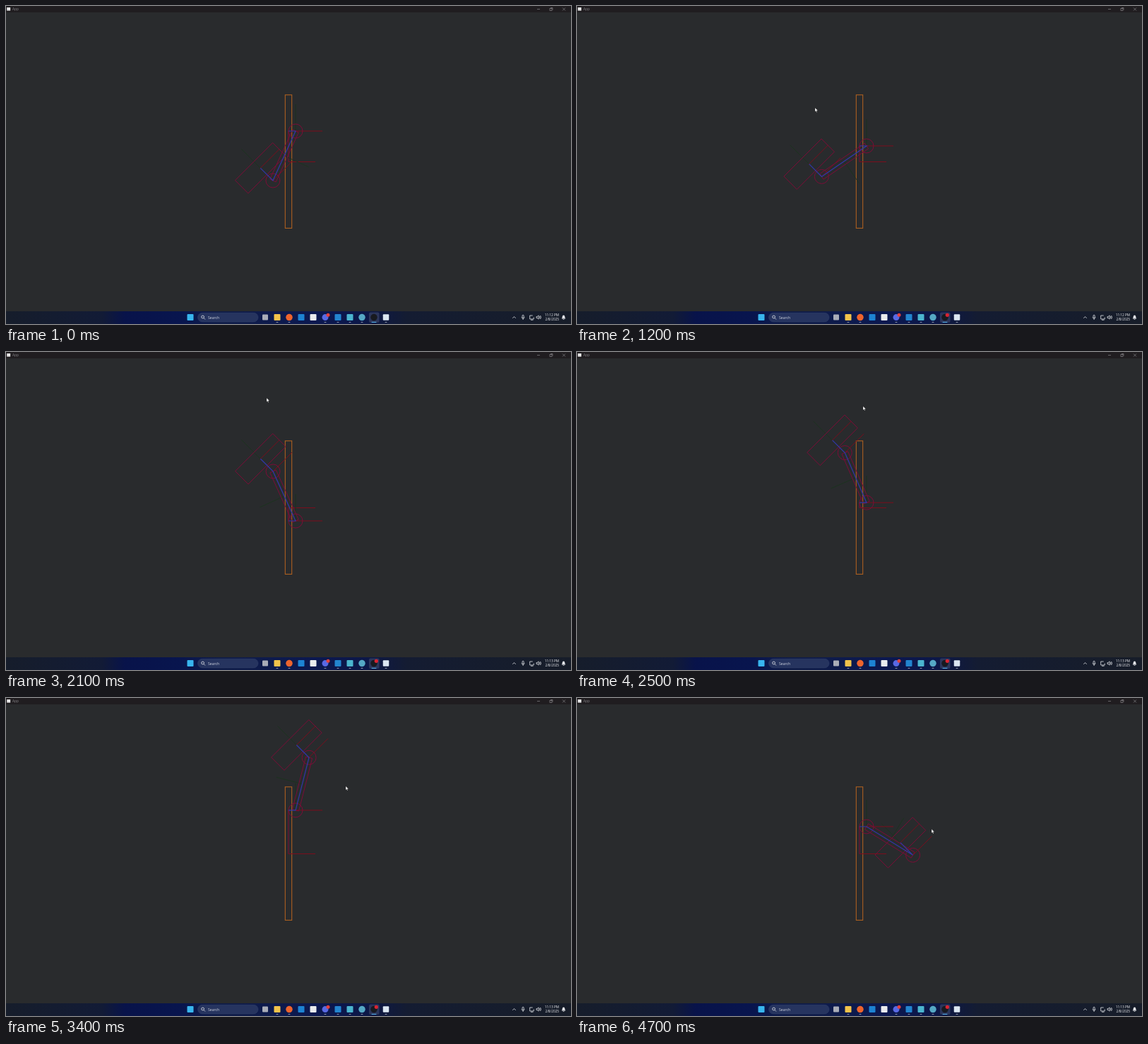
An HTML page for the animation above (4.8 s loop, 800 px wide and 450 px high).

```html
<!DOCTYPE html>
<html lang="en">
<head>
<meta charset="utf-8">
<title>App</title>
<style>
html, body { margin: 0; width: 100%; height: 100%; overflow: hidden; background: #292b2d; }
svg { display: block; width: 100vw; height: 100vh; }
text { font-family: "Open Sans", "Noto Sans", sans-serif; }
.line { fill: none; stroke-width: 1; }
.body { stroke: #7d0c37; }
.red { stroke: #7c0d1c; }
.green { stroke: #1c331f; }
.blue { stroke: #3038a8; stroke-width: 1.2; }
.tray { fill: none; stroke: #e4e6ea; stroke-width: .8; }
</style>
</head>
<body>
<svg viewBox="0 0 800 450" preserveAspectRatio="none">
  <defs>
    <linearGradient id="bar">
      <stop offset="0" stop-color="#161d2b"/>
      <stop offset=".17" stop-color="#121b36"/>
      <stop offset=".21" stop-color="#08134a"/>
      <stop offset=".31" stop-color="#08154e"/>
      <stop offset=".38" stop-color="#101d48"/>
      <stop offset=".55" stop-color="#0b1850"/>
      <stop offset=".64" stop-color="#0c1747"/>
      <stop offset=".71" stop-color="#141c32"/>
      <stop offset="1" stop-color="#171d29"/>
    </linearGradient>
  </defs>
  <rect width="800" height="450" fill="#292b2d"/>

  <!-- title bar -->
  <rect width="800" height="9" fill="#201d20"/>
  <rect x="1.2" y="2" width="5" height="4.6" fill="#e6e6e6"/>
  <text x="9" y="6.2" font-size="4.8" fill="#858386">App</text>
  <g fill="none" stroke="#858386" stroke-width=".7">
    <path d="M752 4.5h4M788 2.5l4 4m0-4l-4 4"/>
    <rect x="770" y="3.4" width="3" height="3"/>
    <path d="M771 2.5h3v3"/>
  </g>

  <!-- mechanism -->
  <rect class="line" x="395.3" y="125.8" width="9.4" height="188.6" stroke="#b9651f"/>
  <path class="line red" d="M400 220.5H438"/>
  <path class="line body" id="mast"/>
  <path class="line green" id="greens"/>
  <path class="line red" id="reds"/>
  <path class="line body" id="bodies"/>
  <path class="line blue" id="links"/>

  <!-- taskbar -->
  <rect y="432" width="800" height="18" fill="url(#bar)"/>
  <rect x="271.5" y="434.3" width="85.5" height="12.6" rx="6.3" fill="#26345f" stroke="#34426c" stroke-width=".5"/>
  <circle cx="278.6" cy="440" r="1.9" class="tray"/>
  <path class="tray" d="M280 441.5l2 2"/>
  <text x="286" y="442.6" font-size="5.1" fill="#d3d7e2">Search</text>
  <rect x="514" y="433.5" width="14.5" height="14.5" rx="2" fill="#2c365b"/>
  <g id="icons"></g>
  <g id="recording"><circle cx="524.3" cy="437.3" r="2.6" fill="#d92332"/></g>
  <path class="tray" d="M717.3 441.8l2.2-2.2 2.2 2.2"/>
  <rect x="731" y="437.3" width="2.2" height="4" rx="1.1" class="tray"/>
  <path class="tray" d="M730 440.5q2.100 4 4.200 0M732.100 442.500v1.500"/>
  <path class="tray" d="M747.200 440.500v2.500h-5.500v-5h4M743 444.300h3.500"/>
  <path class="tray" d="M751 439.500h1.300l1.700-1.700v5.400l-1.700-1.700h-1.300zM755.300 439q1.200 1.500 0 3M756.500 438q2 2.500 0 5"/>
  <g font-size="4.700" fill="#f0f1f4" text-anchor="end">
    <text id="clock" x="783" y="438.700"></text>
    <text x="783" y="445.200">2/8/2025</text>
  </g>
  <path d="M786.700 442.500q1-1 1-3 .3-2 1.800-2t1.800 2q0 2 1 3zM788.600 443.200h1.800v.8h-1.800z" fill="#e4e6ea"/>

  <path id="cursor" d="M0 0V5.600L1.300 4.400 2.200 6.400 3.100 6 2.200 4.100H4z" fill="#fff" stroke="#111" stroke-width=".3"/>
</svg>
<script>
const LOOP = 4800, STEP = 100, ARM = 77, AXIS = 38, JOINT = 10;
const D = Math.SQRT1_2;
const $ = id => document.getElementById(id);

// time, arm angle in degrees, shoulder height
const armKeys = [
  [0, 114.6, 177], [600, 116.500, 178.500], [800, 120.600, 182], [1000, 131, 189],
  [1200, 145.700, 198], [1800, 221, 246], [2100, 245.500, 239], [2400, 244.500, 221],
  [3000, 256.500, 174], [3300, 276, 159], [3900, 326.100, 158], [4200, 359, 159], [4700, 391.600, 182]
];
// time, pointer tip
const cursorKeys = [
  [100, 500, 405], [250, 380, 290], [400, 267, 235], [600, 294, 223], [800, 305, 214],
  [1200, 337, 144], [1800, 361, 80], [2100, 369, 65], [2250, 377, 62], [3000, 461, 106],
  [3600, 491, 134], [3900, 498, 150], [4200, 504, 163], [4700, 502, 185.500]
];

// shape, centre x, size, colour, underline width
const icons = [
  ["square", 261, 9, "#38b5ee", 0], ["square", 367, 8, "#a9adb8", 0],
  ["square", 384, 9, "#f2c34b", 3], ["circle", 401, 9.500, "#ee642d", 3],
  ["square", 418, 9, "#1d83d2", 0], ["square", 435, 9, "#e9ebee", 0],
  ["circle", 452, 9, "#5969e4", 3], ["square", 470, 9, "#2385cf", 3],
  ["square", 487, 9, "#4bb5cf", 3], ["circle", 504, 9.500, "#55a8c5", 3],
  ["circle", 521, 9.500, "#181a20", 7], ["square", 538, 8.500, "#dce7f2", 3]
];
$("icons").innerHTML = icons.map(([shape, x, s, color, under]) =>
  (shape === "circle"
    ? `<circle cx="${x}" cy="440.6" r="${s / 2}" fill="${color}"/>`
    : `<rect x="${x - s / 2}" y="${440.6 - s / 2}" width="${s}" height="${s}" rx="1" fill="${color}"/>`) +
  (under ? `<rect x="${x - under / 2}" y="447" width="${under}" height="1" rx=".5" fill="${under > 3 ? "#58b8ef" : "#8c95ab"}"/>` : "")
).join("") + '<circle cx="456" cy="437.2" r="2.5" fill="#e0413f"/>';

function sample(keys, t) {
  let i = 0;
  while (i < keys.length - 2 && t > keys[i + 1][0]) i++;
  const a = keys[i], b = keys[i + 1];
  const k = Math.min(1, Math.max(0, (t - a[0]) / (b[0] - a[0])));
  return [a[1] + (b[1] - a[1]) * k, a[2] + (b[2] - a[2]) * k];
}

const pt = (x, y) => `${x.toFixed(2)} ${y.toFixed(2)}`;
const ray = (x, y, dx, dy, len) => `M${pt(x, y)}L${pt(x + dx * len, y + dy * len)}`;
const ring = (x, y, r) => `M${pt(x + r, y)}A${r} ${r} 0 1 1 ${pt(x - r, y)}A${r} ${r} 0 1 1 ${pt(x + r, y)}`;

// rectangle around a centre whose long side follows (ux, uy)
function box(x, y, ux, uy, half, wide) {
  const corners = [[-1, -1], [1, -1], [1, 1], [-1, 1]].map(([a, b]) =>
    pt(x + ux * half * a - uy * wide * b, y + uy * half * a + ux * wide * b));
  return `M${corners.join("L")}Z`;
}

function draw(t) {
  const [deg, sy] = sample(armKeys, t);
  const a = deg * Math.PI / 180, ux = Math.cos(a), uy = Math.sin(a);
  const sx = 410, ex = sx + ux * ARM, ey = sy + uy * ARM;
  const mx = (sx + ex) / 2, my = (sy + ey) / 2;
  const tx = ex - 17.700, ty = ey - 17.700;

  $("mast").setAttribute("d", `M400 220.5V${sy}`);
  $("greens").setAttribute("d", ray(sx, sy, 0, -1, AXIS) + ray(mx, my, uy, -ux, AXIS) + ray(tx, ty, -D, -D, AXIS));
  $("reds").setAttribute("d", ray(sx, sy, 1, 0, AXIS) + ray(ex, ey, D, -D, AXIS) + ray(tx, ty, D, -D, AXIS));
  $("bodies").setAttribute("d", ring(sx, sy, JOINT) + ring(ex, ey, JOINT) +
    box(mx, my, ux, uy, ARM / 2, 4.700) + box(tx, ty, D, -D, 37.600, 13));
  $("links").setAttribute("d", `M400 ${sy}L${pt(sx, sy)}L${pt(ex, ey)}L${pt(tx, ty)}`);

  const [cx, cy] = sample(cursorKeys, t);
  $("cursor").setAttribute("transform", `translate(${pt(cx, cy)})`);
  const started = t >= 100 ? "visible" : "hidden";
  $("cursor").setAttribute("visibility", started);
  $("recording").setAttribute("visibility", started);
  $("clock").textContent = t < 1500 ? "11:12 PM" : "11:13 PM";
}

const start = performance.now();
function tick() {
  const t = (performance.now() - start) % LOOP;
  draw(Math.floor(t / STEP) * STEP);
  requestAnimationFrame(tick);
}
tick();
</script>
</body>
</html>
```
